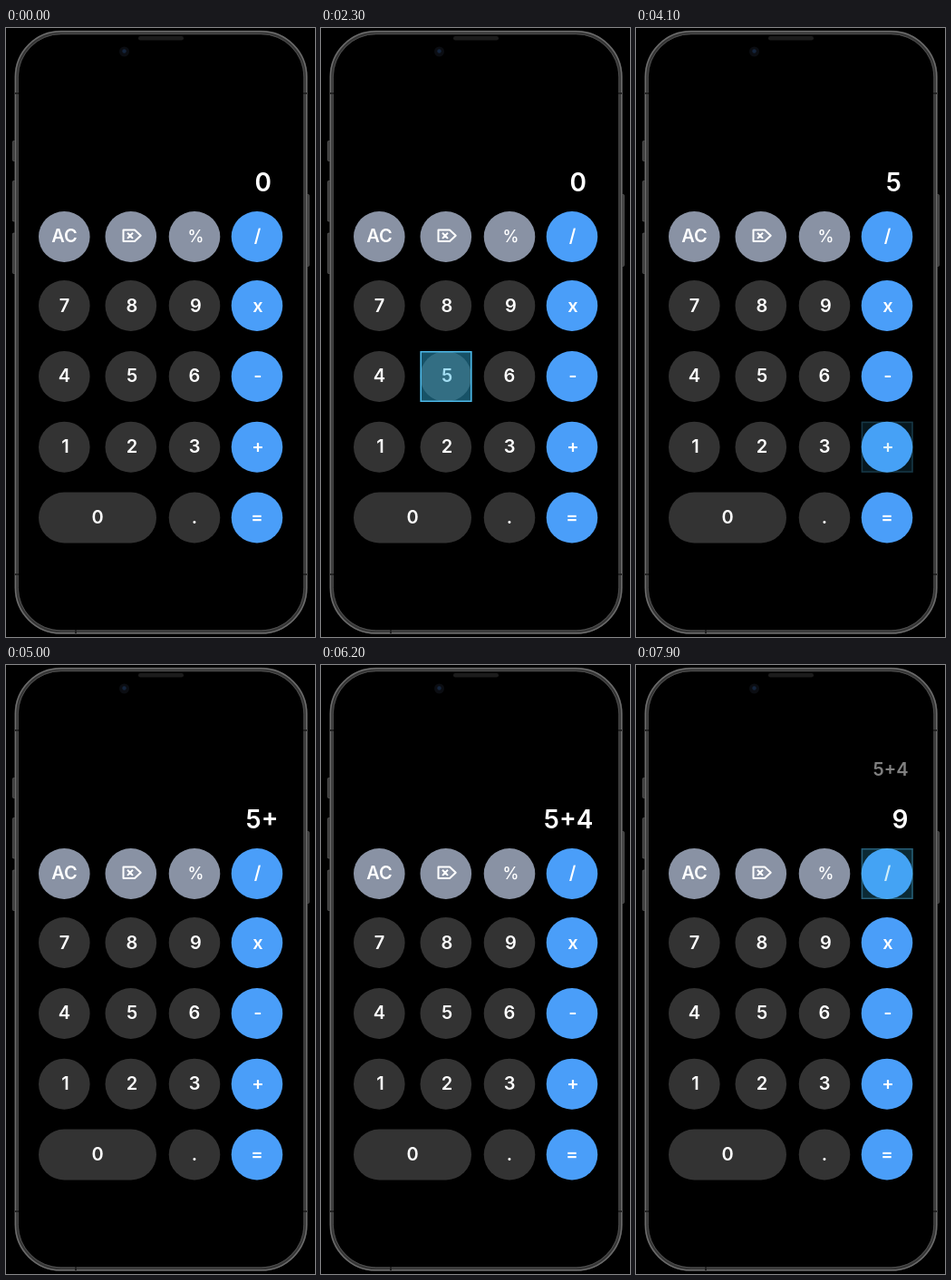
Recreate the animation shown at these times as an HTML page. Size 341 px wide and 671 px high, loop 8000 ms.

```html
<!DOCTYPE html>
<html>
<head>
<meta charset="utf-8">
<style>
html, body { margin: 0; width: 100%; height: 100%; overflow: hidden; background: #000; }
svg { display: block; }
text { font-family: Inter, Roboto, sans-serif; font-weight: 600; fill: #fff; }
#keys text { font-size: 20px; text-anchor: middle; }
#main, #past { text-anchor: end; }
#main { font-size: 28px; }
#past { font-size: 20px; fill: #808080; }
</style>
</head>
<body>
<svg width="341" height="671" viewBox="0 0 341 671">
  <rect width="341" height="671"/>
  <!-- phone body -->
  <g fill="#3c3c3c" stroke="#666" stroke-width=".7">
    <rect x="7.4" y="124.5" width="4" height="22" rx="1"/>
    <rect x="7.4" y="168.5" width="4" height="44.5" rx="1"/>
    <rect x="7.4" y="226" width="4" height="44.5" rx="1"/>
    <rect x="330.5" y="183.5" width="4" height="79" rx="1"/>
  </g>
  <g fill="none">
    <rect x="11.7" y="5" width="318.8" height="660.5" rx="49" stroke="#353535" stroke-width="4.5"/>
    <rect x="10.5" y="3.8" width="321.2" height="663" rx="50" stroke="#6c6c6c" stroke-width="1.5"/>
    <rect x="13.3" y="6.6" width="315.6" height="657.4" rx="47.5" stroke="#555" stroke-width=".8"/>
    <path d="M10 72h4M328 72h4M10 602h4M328 602h4M77 663v4" stroke="#222" stroke-width="2"/>
  </g>
  <rect x="146" y="9" width="50" height="4.5" rx="2.2" fill="#1c1c1c"/>
  <circle cx="130.5" cy="26" r="5.5" fill="#0b0d12"/>
  <circle cx="130.5" cy="25.5" r="2.2" fill="#14243c"/>
  <text id="past" x="300.5" y="122"/>
  <text id="main" y="180"/>
  <g id="keys"></g>
  <path d="M129.5 222.5h12.5l6.7 6.3-6.7 6.3h-12.5zM134 225.7l6 6.2M140 225.7l-6 6.2"
        fill="none" stroke="#fff" stroke-width="2" stroke-linejoin="round"/>
  <g id="tap">
    <rect width="57" height="56" fill="#33b5e5" fill-opacity=".45"/>
    <rect x=".75" y=".75" width="55.5" height="54.5" fill="none" stroke="#4cb8e8" stroke-width="1.5"/>
  </g>
</svg>
<script>
const $ = id => document.getElementById(id);
const GRAY = '#8992a4', DARK = '#333', BLUE = '#4a9ef9';
const cols = [36, 109.5, 179.7, 248.7], rows = [202, 278, 356, 433.7, 511.5];

// label, column, row, fill, label centre, baseline
const keys = [
  ['AC', 0, 0, GRAY, 64.5, 236], ['', 1, 0, GRAY, 0, 0],
  ['%', 2, 0, GRAY, 209.5, 236], ['/', 3, 0, BLUE, 277.5, 236],
  ['7', 0, 1, DARK, 64.5, 313], ['8', 1, 1, DARK, 139, 313],
  ['9', 2, 1, DARK, 209.5, 313], ['x', 3, 1, BLUE, 278, 313],
  ['4', 0, 2, DARK, 64.5, 389.5], ['5', 1, 2, DARK, 139, 389.5],
  ['6', 2, 2, DARK, 208, 389.5], ['-', 3, 2, BLUE, 278, 389.5],
  ['1', 0, 3, DARK, 65.5, 467.5], ['2', 1, 3, DARK, 139, 467.5],
  ['3', 2, 3, DARK, 208, 467.5], ['+', 3, 3, BLUE, 278, 467.5],
  ['0', 0, 4, DARK, 101, 545.5], ['.', 2, 4, DARK, 208, 545.5],
  ['=', 3, 4, BLUE, 277, 545.5]
];
$('keys').innerHTML = keys.map(([label, c, r, fill, x, y]) =>
  `<rect x="${cols[c]}" y="${rows[r]}" width="${label === '0' ? 130 : 56.6}" height="56" rx="28.2" fill="${fill}"/>
   <text x="${x}" y="${y}"${label === '%' ? ' style="font-size:18px;font-weight:500"' : ''}>${label}</text>`
).join('');

// start time, column, row
const taps = [[2300, 1, 2], [3800, 3, 3], [5100, 0, 2], [6400, 3, 4], [7700, 3, 0]];
// start time, text, right edge, expression above
const screens = [[0, '0', 293, ''], [3000, '5', 293, ''], [4500, '5+', 300.5, ''],
  [5800, '5+4', 300.5, ''], [7000, '9', 300.5, '5+4']];
const FADE = 500;

function draw(now) {
  const t = Math.floor(now % 8000 / 100) * 100;
  const [, value, right, past] = screens.findLast(s => t >= s[0]);
  $('main').textContent = value;
  $('main').setAttribute('x', right);
  $('past').textContent = past;

  const tap = taps.find(([start]) => t >= start && t < start + FADE);
  $('tap').setAttribute('opacity', tap ? (1 - (t - tap[0]) / FADE) ** 1.3 : 0);
  if (tap) $('tap').setAttribute('transform', `translate(${cols[tap[1]]} ${rows[tap[2]]})`);
}

const begin = performance.now();
function loop() {
  draw(performance.now() - begin);
  requestAnimationFrame(loop);
}
loop();
</script>
</body>
</html>
```
